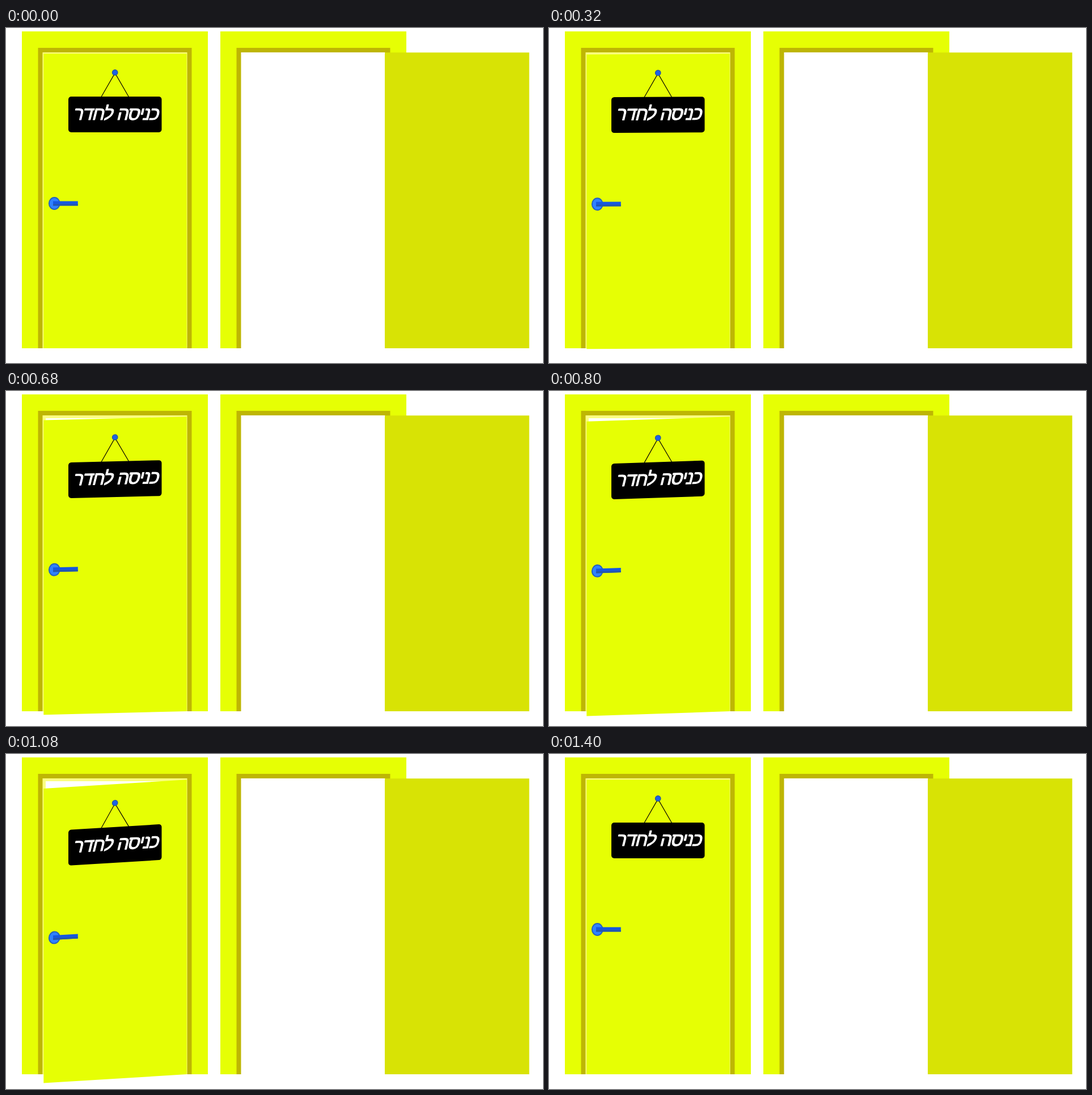
These frames come from a looping animation (947x591 px, 1.44 s). An HTML page:

```html
<!DOCTYPE html>
<html lang="he">
<head>
<meta charset="utf-8">
<title>כניסה לחדר</title>
<style>
  html, body { margin: 0; width: 100%; height: 100%; overflow: hidden; background: #fff; }
  svg { display: block; width: 947px; height: 591px; }
  text {
    font: 33px "Liberation Sans", "DejaVu Sans", sans-serif;
    letter-spacing: -1.4px;
    fill: #fff; stroke: #fff; stroke-width: 1.1; stroke-linejoin: round;
    text-anchor: middle;
  }
</style>
</head>
<body>
<svg viewBox="0 0 947 591" xmlns="http://www.w3.org/2000/svg">
  <!-- closed doorway -->
  <path fill="#e6ff04" d="M28 6H356V565H28Z"/>
  <path fill="#beb604" d="M56.5 35H327.5V565H56.5Z"/>
  <path fill="#fbff80" d="M64.5 43H319.5V565H64.5Z"/>
  <path fill="#fff" d="M70 48H314V565H70Z"/>

  <!-- open doorway -->
  <path fill="#e6ff04" d="M378 6H706V565H378Z"/>
  <path fill="#beb604" d="M406.5 35H677.5V565H406.5Z"/>
  <path fill="#fff" d="M414.5 43H669V565H414.5Z"/>
  <path fill="#d8e305" d="M668 43.3H922.7V565H668Z"/>

  <g id="door">
    <path fill="#e6ff04" d="M66.3 45.3H318.6V565H66.3Z"/>
    <path fill="none" stroke="#000" stroke-width="1.2" d="M168 121.5L192.2 79.5L216.5 121.5"/>
    <circle cx="192.2" cy="78.5" r="4.7" fill="#1c62e6" stroke="#27549f" stroke-width="1.4"/>
    <rect x="110" y="121" width="164.5" height="63" rx="5"/>
    <text transform="translate(192.5 161.5) skewX(-14)" direction="rtl">כניסה לחדר</text>
    <ellipse cx="85.3" cy="309.5" rx="9.4" ry="10.4" fill="#2f82ff" stroke="#2562bd" stroke-width="2"/>
    <path fill="#1658e0" d="M83 305.5H126.8V313.5H83Z"/>
    <path fill="#2457ab" d="M83 310.5H126.8V313.5H83Z"/>
  </g>
</svg>
<script>
  const LOOP = 1440, STEP = 40, PEAK = 1200, SHUT = 1400;
  const HINGE = 319, WIDTH = 253, DROP = 19.3;
  const door = document.getElementById('door');

  // How far the free edge hangs below its closed place, in px.
  function swing(t) {
    if (t <= PEAK) return DROP * (t / PEAK) ** 2;
    const u = Math.min(1, (t - PEAK) / (SHUT - PEAK));
    return DROP * (1 - u ** 1.18);
  }

  function draw(ms) {
    const t = Math.floor((ms % LOOP) / STEP) * STEP;
    const slope = swing(t) / WIDTH;
    door.setAttribute('transform', `matrix(1 ${-slope} 0 1 0 ${slope * HINGE})`);
  }

  const start = performance.now();
  function tick() {
    draw(performance.now() - start);
    requestAnimationFrame(tick);
  }
  tick();
</script>
</body>
</html>
```
